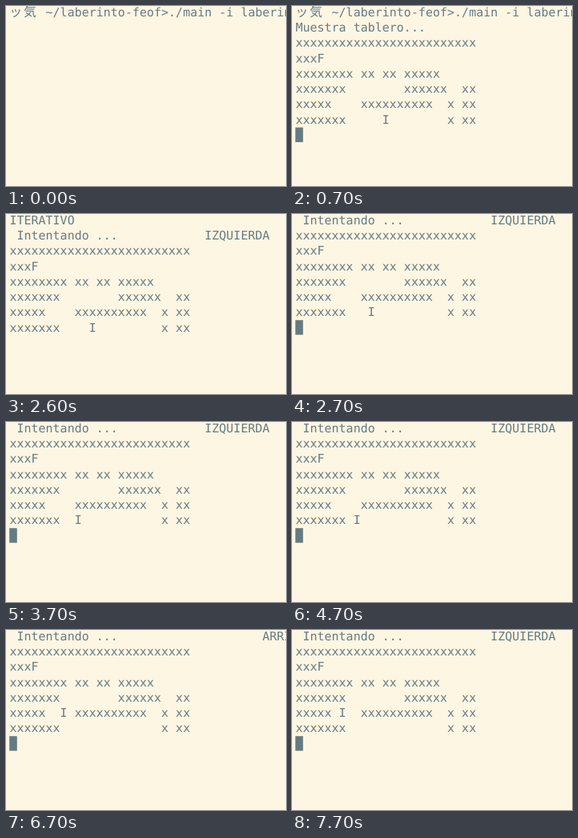
An HTML page for the animation above (8 s loop, 350 px wide and 226 px high).

```html
<!DOCTYPE html>
<html lang="es">
<meta charset="utf-8">
<title>Laberinto</title>
<style>
  html, body { margin: 0; height: 100%; overflow: hidden; background: #fdf6e3; }
  svg { display: block; width: 350px; height: 226px; fill: #657b83; }
  text { font: 15px "DejaVu Sans Mono", monospace; white-space: pre; text-rendering: geometricPrecision; }
  .kanji { font: 16px "Noto Sans CJK JP", "Noto Sans CJK", sans-serif; }
</style>
<svg viewBox="0 0 350 226">
  <g id="prompt"><text class="kanji" x="4.3" y="13">ッ</text><text class="kanji" x="22" y="13">気</text></g>
  <g id="rows"></g>
  <rect id="cursor" x="4.2" width="9.6" height="18.4"/>
</svg>
<script>
const LOOP = 8000, START = 700, STEP = 1000, BLINK = 500, PITCH = 19.25;
const COMMAND = '     ~/laberinto-feof>./main -i laberinto';
const MAZE = [
  'x'.repeat(25),
  'xxxF',
  'xxxxxxxx xx xx xxxxx',
  'xxxxxxx        xxxxxx  xx',
  'xxxxx    xxxxxxxxxx  x xx',
  'xxxxxxx              x xx',
];
// Position of the walker [column, maze row] after each step
const PATH = [[12, 5], [11, 5], [10, 5], [9, 5], [8, 5], [7, 5], [7, 4], [6, 4]];

const $ = id => document.getElementById(id);
const lines = Array.from({ length: 9 }, (_, row) => {
  const line = document.createElementNS('http://www.w3.org/2000/svg', 'text');
  line.setAttribute('x', 4.4);
  line.setAttribute('y', 12.9 + row * PITCH);
  return $('rows').appendChild(line);
});

function maze([col, row]) {
  return MAZE.map((s, i) => i === row ? s.slice(0, col) + 'I' + s.slice(col + 1) : s);
}

function attempt(step) {
  const up = PATH[step][1] < PATH[step - 1][1];
  return ' Intentando ...'.padEnd(up ? 35 : 27) + (up ? 'ARRIBA' : 'IZQUIERDA');
}

function screen(step) {
  if (step < 0) return [COMMAND];
  const board = maze(PATH[step]);
  if (step === 0) return [COMMAND, 'Muestra tablero...', ...board];
  return [...(step === 1 ? ['ITERATIVO'] : []), attempt(step), ...board];
}

let shown;
function draw(now) {
  const t = now % LOOP - START, step = Math.floor(t / STEP);
  if (step !== shown) {
    shown = step;
    const text = screen(step);
    lines.forEach((line, i) => line.textContent = text[i] || '');
    $('prompt').style.display = step > 0 ? 'none' : '';
    $('cursor').setAttribute('y', text.length * PITCH - 1.5);
  }
  $('cursor').style.display = t >= 0 && t % STEP < BLINK ? '' : 'none';
}

const begin = performance.now();
(function tick() {
  draw(performance.now() - begin);
  requestAnimationFrame(tick);
})();
</script>
</html>
```
